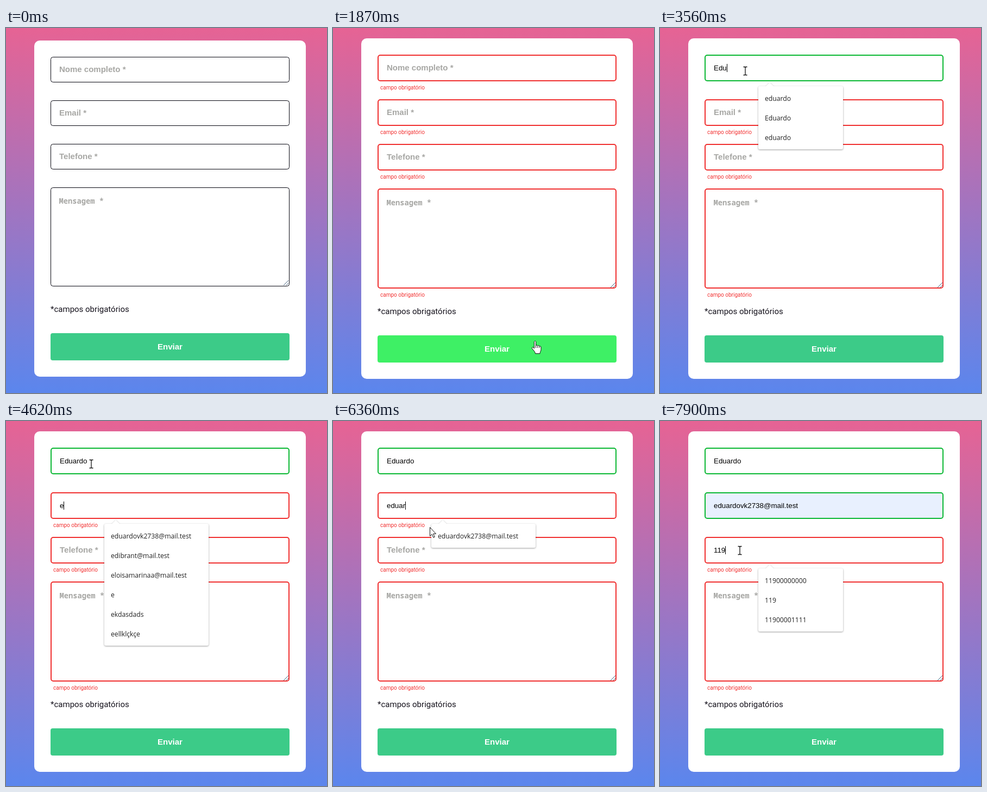
An HTML page for the animation above (8000 ms loop, 591 px wide and 671 px high).

```html
<!DOCTYPE html>
<html lang="pt-BR">
<head>
<meta charset="utf-8">
<title>Formulário</title>
<style>
  html, body { margin: 0; width: 100%; height: 100%; overflow: hidden; }
  svg { display: block; width: 591px; height: 671px; }
  text { white-space: pre; }
  .label { font: bold 15px "Liberation Sans", Arial, sans-serif; fill: #a7a7a4; }
  .mono { font: bold 13.75px "Noto Sans Mono", monospace; fill: #a7a7a4; }
  .typed { font: 13.333px "Liberation Sans", Arial, sans-serif; fill: #000; }
  .note { font: 15px Roboto, sans-serif; fill: #15121c; }
  .error { font: 10px Roboto, sans-serif; fill: #f23131; }
  .send { font: bold 15px "Liberation Sans", Arial, sans-serif; fill: #fff; text-anchor: middle; }
  .item { font: 12.2px "Open Sans", "Noto Sans", sans-serif; fill: #222; }
  .popup { filter: drop-shadow(0 1px 1.5px rgba(0, 0, 0, .38)); }
</style>
</head>
<body>
<svg viewBox="0 0 591 671" xmlns="http://www.w3.org/2000/svg">
  <defs>
    <linearGradient id="bg" x1="0" y1="0" x2="0" y2="1">
      <stop offset="0" stop-color="#e66394"/>
      <stop offset="1" stop-color="#5b86ed"/>
    </linearGradient>
  </defs>
  <rect width="591" height="671" fill="url(#bg)"/>
  <g id="stage"></g>
</svg>
<script>
const LOOP = 8000, BLINK = 530;
const stage = document.getElementById('stage');
const pen = document.createElement('canvas').getContext('2d');

const labels = ['Nome completo *', 'Email *', 'Telefone *'];
const email = 'eduardovk2738@mail.test';
const history = [
  ['eduardo', 'Eduardo', 'eduardo', 'e', 'ekçlkçse', 'eeeelk'],
  [email, 'edibrant@mail.test', 'eloisamarinaa@mail.test', 'e', 'ekdasdads', 'eellklçkçe'],
  ['11900000000', '119', '11900001111', '1', '1234', '1020']
];

// Each step changes part of the form state at its time.
const type = (start, times, field, text) =>
  times.map((t, i) => [t, { ['v' + field]: text.slice(0, start + i) }]);
const steps = [
  [0, { v0: '', v1: '', v2: '', focus: -1, open: false, checked: false, valid: 0 }],
  [1270, { checked: true }],
  [2630, { focus: 0 }],
  [3290, { v0: 'E', open: true, bare: true }],
  [3490, { v0: 'Ed', bare: false }],
  [3560, { v0: 'Edu', valid: 1 }],
  ...type(4, [3690, 3790, 3890, 3990], 0, 'Eduardo'),
  [4090, { focus: 1, open: false }],
  [4620, { v1: 'e', open: true }],
  ...type(2, [4690, 4760, 4830, 4890], 1, email),
  [4960, {}],
  [6430, { preview: true }],
  [6700, { v1: email, preview: false, filled: true, open: false, valid: 2 }],
  [6980, { focus: 2 }],
  [7050, { open: true }],
  ...type(1, [7380, 7640, 7900], 2, '119')
];
const clicks = [[1140, 1270], [2630, 2700], [6630, 6700], [6980, 7050]];

// Pointer stops: time, x, y
const path = [
  [393, 402, 682], [740, 382, 600], [1803, 382, 600], [2300, 161, 98],
  [2430, 161, 98], [2630, 157, 79], [5753, 157, 79], [6360, 178, 195],
  [6500, 190, 210], [6700, 190, 210], [6980, 147, 238], [LOOP, 147, 238]
];

const clamp = v => Math.max(0, Math.min(1, v));
const text = (cls, x, y, s) => `<text class="${cls}" x="${x}" y="${y}">${s}</text>`;
const box = (x, y, w, h, r, attrs) =>
  `<rect x="${x}" y="${y}" width="${w}" height="${h}" rx="${r}" ${attrs}/>`;

function stateAt(t) {
  const s = {};
  for (const [at, change] of steps) {
    if (at > t) break;
    Object.assign(s, change);
    s.since = at;
  }
  return s;
}

function pointerAt(t) {
  const i = path.findIndex(p => p[0] > t);
  if (i === 0) return path[0].slice(1);
  const [t0, x0, y0] = path[i - 1], [t1, x1, y1] = path[i];
  const u = Math.min(1, Math.floor((t - t0) / 67) * 67 / (t1 - t0));
  const k = u * u * (3 - 2 * u);
  return [x0 + (x1 - x0) * k, y0 + (y1 - y0) * k];
}

function frame(y, h, thick, color, fill = '#fff') {
  return box(82 + thick / 2, y + thick / 2, 440 - thick, h - thick, 4,
    `fill="${fill}" stroke="${color}" stroke-width="${thick}"`);
}

function textWidth(s) {
  pen.font = '13.333px "Liberation Sans", Arial, sans-serif';
  return pen.measureText(s).width;
}

function field(i, s, t) {
  const on = s.checked, y = on ? 49 + 82 * i : 53 + 80 * i;
  const ok = i < s.valid;
  const color = !on ? '#080812' : ok ? '#0bb834' : '#f03030';
  const blue = i === 1 && (s.preview || s.filled);
  const value = i === 1 && s.preview ? email : s['v' + i];
  let out = frame(y, on ? 49 : 47, on ? 2 : 1, color, blue ? '#e8f0fe' : '#fff');
  out += value ? text('typed', 99, y + 29, value)
    : text('label', on ? 99 : 98, y + (on ? 29 : 28), labels[i]);
  if (on && !ok) out += text('error', 87, y + 64, 'campo obrigatório');
  const lit = Math.floor((t - s.since) / BLINK) % 2 === 0;
  if (s.focus === i && lit && !s.preview)
    out += box(Math.round(99 + textWidth(value)), y + 17, 1, 15, 0, 'fill="#000"');
  return out;
}

function message(on) {
  const y = on ? 295 : 293, h = on ? 184 : 182, b = y + h;
  return frame(y, h, on ? 2 : 1, on ? '#f03030' : '#080812') +
    text('mono', on ? 98.5 : 97.5, y + (on ? 31 : 30), 'Mensagem *') +
    `<path d="M511 ${b - 2}l9 -9M516 ${b - 2}l4 -4" stroke="#44617c" fill="none"/>` +
    (on ? text('error', 87, b + 15, 'campo obrigatório') : '');
}

function button(t, on) {
  const y = on ? 565 : 561;
  const k = clamp((t - 500) / 240) * (1 - clamp((t - 1940) / 240));
  const rgb = [60, 203, 136].map((c, i) => Math.round(c + ([62, 240, 101][i] - c) * k));
  return box(82, y, 440, 50, 4, `fill="rgb(${rgb})"`) + text('send', 302, y + 30, 'Enviar');
}

function popup(s) {
  if (!s.open) return '';
  const i = s.focus, y = 107 + 82 * i, w = i === 1 ? 192 : 156;
  const items = history[i].filter(v => v.toLowerCase().startsWith(s['v' + i].toLowerCase()));
  let out = '';
  if (!s.bare) {
    out += `<g class="popup">${box(181, y, w, items.length * 36 + 8, 3, 'fill="#fff"')}` +
      `<path d="M194 ${y + 1}l8 -8 8 8z" fill="#fff"/></g>`;
    if (s.preview) out += box(181, y + 4, w, 36, 0, 'fill="#ededee"');
  }
  return out + items.map((v, n) => text('item', 193, y + 26.5 + 36 * n, v)).join('');
}

const shapes = {
  arrow: '<path d="M.5 .5V16.5L4.2 13.2 6.8 19.2 9.2 18.2 6.7 12.3H11.5Z" fill="#fff" stroke="#111"/>',
  beam: '<path d="M-3.5 -7.5H-1L0 -6.5 1 -7.5H3.5M0 -6.5V6.5M-3.5 7.5H-1L0 6.5 1 7.5H3.5" fill="none" stroke="#111" stroke-width="1.3"/>',
  hand: '<path d="M-.5 2C-.5 -.2 2.5 -.2 2.5 2V9C3 7.4 5.6 7.6 5.8 9.3 6.6 8 8.8 8.5 9 10.2 10.2 9.3 12 10 12 11.8V16C12 19 10 20 10 23.5H1.5C1.5 20.5 -1.5 18 -4.4 14.2 -5.5 12.2 -3.2 11 -1.8 12.5L-.5 14Z" fill="#fff" stroke="#111"/>' +
    '<path d="M2.5 9V13M5.8 9.5V13M9 10.5V13" stroke="#111"/>'
};

function pointerKind(x, y, on) {
  const inside = (top, h) => x >= 82 && x < 522 && y >= top && y < top + h;
  if (inside(on ? 565 : 561, 50)) return 'hand';
  const inField = [0, 1, 2].some(i => inside(on ? 49 + 82 * i : 53 + 80 * i, on ? 49 : 47));
  return inField || inside(on ? 295 : 293, 182) ? 'beam' : 'arrow';
}

function pointer(t, on) {
  const [x, y] = pointerAt(t);
  const down = clicks.some(([a, b]) => t >= a && t < b);
  return (down ? `<circle cx="${x}" cy="${y}" r="12" fill="#fff200" fill-opacity=".55"/>` : '') +
    `<g transform="translate(${x.toFixed(1)} ${y.toFixed(1)})">${shapes[pointerKind(x, y, on)]}</g>`;
}

let last = '';
function draw(t) {
  const s = stateAt(t), on = s.checked;
  const html = box(52, on ? 19 : 23, 500, on ? 626 : 618, 10, 'fill="#fff"') +
    [0, 1, 2].map(i => field(i, s, t)).join('') + message(on) +
    text('note', 82, on ? 526 : 522, '*campos obrigatórios') +
    button(t, on) + popup(s) + pointer(t, on);
  if (html !== last) stage.innerHTML = last = html;
}

const begin = performance.now();
function tick() {
  draw((performance.now() - begin) % LOOP);
  requestAnimationFrame(tick);
}
tick();
</script>
</body>
</html>
```
